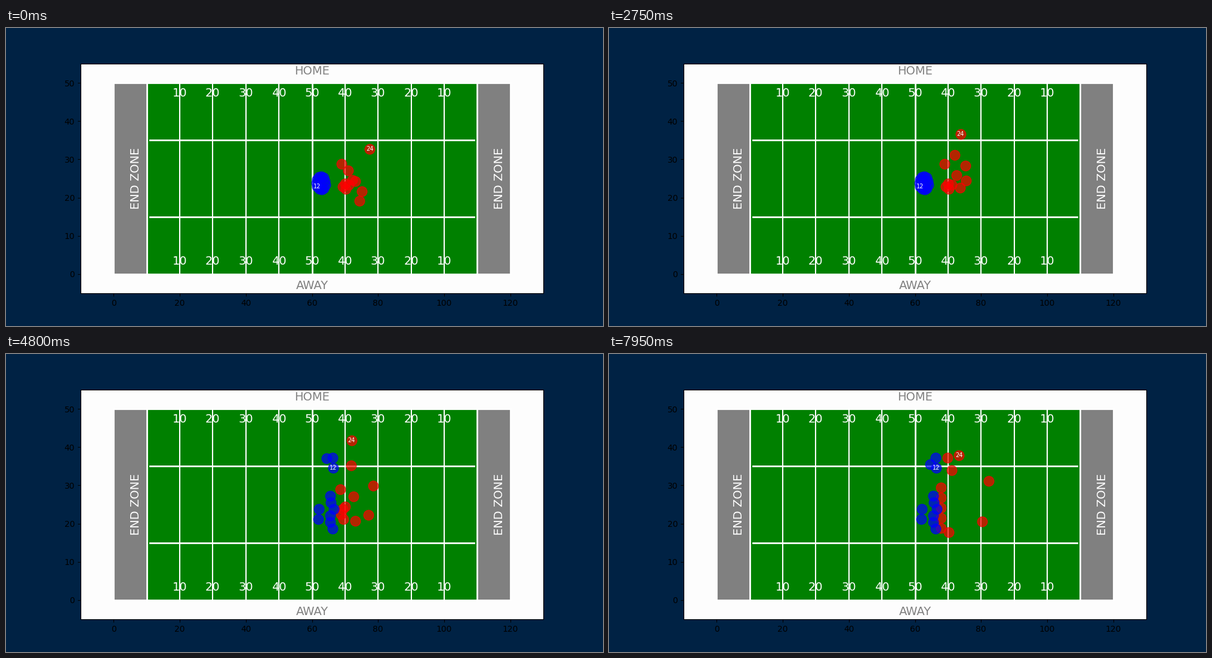
Recreate the animation shown at these times as a matplotlib script. Size 1000 by 500 pixels, loop 8 s.

```python
import numpy as np
import matplotlib.pyplot as plt
from matplotlib.animation import FuncAnimation
from matplotlib.patches import Rectangle

LOOP_MS, STEP_MS = 8000, 50
NOW = np.arange(0, LOOP_MS, STEP_MS) / 1000

# Player positions are stage pixels with y down; times are seconds.
BEATS = [0, 1.5, 4.1, 5.6, 6.8]
BREAK, JOG = 2.85, 41


def ramp(start, end):
    """Progress 0..1 between two times, as a column over all frames."""
    return np.clip((NOW - start) / (end - start), 0, 1)[:, None]


def move(a, b, start, end):
    a, b = np.array(a), np.array(b)
    return a + ramp(start, end) * (b - a)


def jog(a, b):
    """Leave the huddle at a steady speed until the spot is reached."""
    return move(a, b, BREAK, BREAK + np.hypot(*np.subtract(b, a)) / JOG)


def roam(*stops):
    """Walk through one stop per beat."""
    return np.column_stack([np.interp(NOW, BEATS, v) for v in zip(*stops)])


def ring(center, radii, degrees):
    a = np.radians(degrees)
    return np.add(center, np.multiply(radii, (np.cos(a), np.sin(a))))


def offence():
    line_x = 543 + np.array([0, 1, 6, 0, 0, 4])
    line = list(zip(line_x, np.linspace(238, 293, 6)))
    slot, passer, motion = (547, 174), (548.5, 192), (543, 149)
    # Clockwise around the huddle
    spots = [slot, *line, (523, 277.5), passer, (524.5, 260.5), motion]
    paths = [jog(ring((528, 260.5), (7.3, 11.5), k * 360 / 11 - 115), spot)
             for k, spot in enumerate(spots)]
    paths[-1] += ramp(7.1, 7.95) * (-4.5, 36.5)
    paths.append(paths.pop(spots.index(passer)))
    return paths


def defence():
    front = [(562, 229)] + [ring((570, 266), (5.5, 5), -25 - 80 * k)
                            for k in range(4)]
    rows = np.linspace(224.5, 292, 5)
    paths = [move(spot, (556.5, y), BEATS[2], 6.2)
             for spot, y in zip(front, rows)]
    paths += [
        roam((573.5, 239), (578.5, 226), (580.5, 201), (576.5, 173),
             (568, 174.5)),
        roam((585.5, 257.5), (588.5, 237.5), (607.5, 224), (625.5, 219.5),
             (636, 214)),
        roam((580.5, 255), (580.5, 237), (584, 259), (580.5, 216.5),
             (574.5, 195)),
        roam((596.5, 274.5), (593.5, 249.5), (604.5, 264), (610.5, 278),
             (625, 281.5)),
        roam((592.5, 290), (584.5, 264.5), (592.5, 272.5), (578.5, 290.5),
             (569.5, 299)),
    ]
    corner = roam((609.5, 203.5), (594.5, 202.5), (583.5, 152.5),
                  (574.5, 138), (567.5, 145.5))
    # The corner follows the man in motion.
    paths.append(corner + ramp(7.1, 7.95) * (19, 25))
    return paths


def to_field(paths):
    """Stage pixels to yards, with the half pixel lost to marker snapping."""
    px, py = np.moveaxis(np.array(paths) - 0.5, 2, 0)
    return (px - 125) / 775 * 140 - 10, (445 - py) / 385 * 60 - 5


def draw_field(ax):
    for x, width, color in [(0, 120, "gray"), (10, 100, "green")]:
        ax.add_patch(Rectangle((x, 0), width, 50, facecolor=color,
                               edgecolor="white", linewidth=2))
    for x in range(20, 101, 10):
        ax.plot([x, x], [0, 50], color="white",
                linewidth=2 if x == 60 else 1.5)
        for y in (2.5, 46.5):
            ax.text(x, y, str(50 - abs(x - 60)), color="white", fontsize=14,
                    ha="center")
    for y in (15, 35):
        ax.plot([11, 109], [y, y], color="white", linewidth=2)
    for x in (5, 115):
        ax.text(x, 25, "END ZONE", color="white", fontsize=14,
                rotation=90, va="center")
    for y, side in [(53, "HOME"), (-3, "AWAY")]:
        ax.text(60, y, side, color="gray", fontsize=14, ha="center",
                va="center")


plt.rcParams["font.family"] = "DejaVu Sans"
fig = plt.figure(figsize=(10, 5), dpi=100, facecolor="#002244")
ax = fig.add_axes([0.125, 0.11, 0.775, 0.77], facecolor="#fdfdfd")
ax.set_xlim(-10, 130)
ax.set_ylim(-5, 55)
ax.set_xticks(range(0, 121, 20))
ax.set_yticks(range(0, 51, 10))
draw_field(ax)

# The numbered player comes last in each team.
teams = []
for color, number, paths in [("red", "24", defence()),
                             ("blue", "12", offence())]:
    dots, = ax.plot([], [], "o", color=color, markersize=12, alpha=0.7,
                    zorder=3)
    label = ax.text(0, 0, number, color="white", fontsize=7, ha="center",
                    va="center", zorder=4)
    teams.append((dots, label, *to_field(paths)))


def update(i):
    for dots, label, x, y in teams:
        dots.set_data(x[:, i], y[:, i])
        label.set_position((x[-1, i], y[-1, i]))
    return [artist for team in teams for artist in team[:2]]


anim = FuncAnimation(fig, update, frames=LOOP_MS // STEP_MS,
                     interval=STEP_MS, repeat=True, repeat_delay=0)
plt.show()
```
